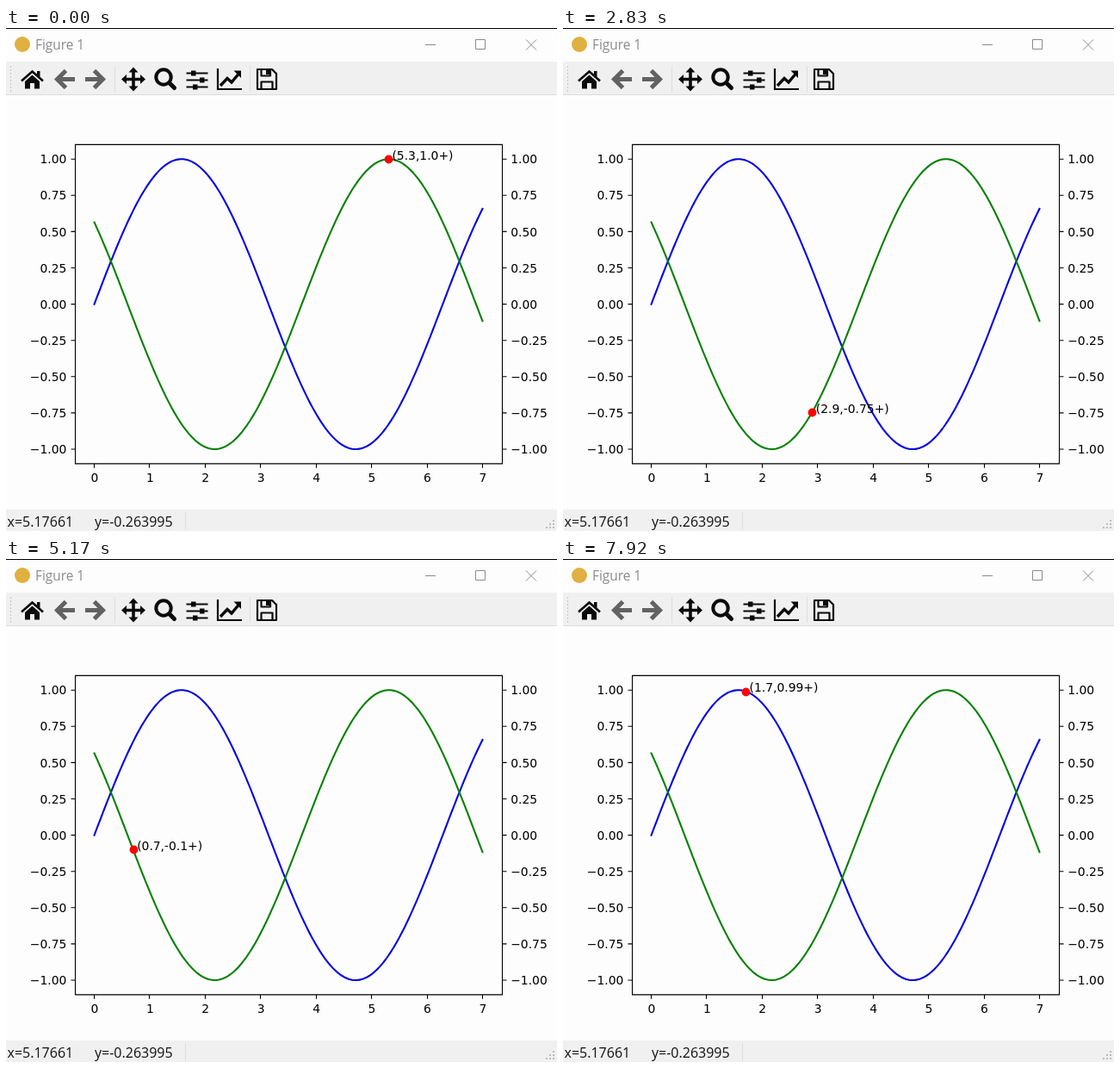
An HTML page that plays this animation: 640x584 px, repeating every 8 s.

```html
<!DOCTYPE html>
<html lang="en">
<head>
<meta charset="utf-8">
<title>Figure 1</title>
<style>
  html, body { margin: 0; width: 100%; height: 100%; overflow: hidden; background: #fdfdfd; }
  svg { display: block; }
  .plot text { font: 13.89px "DejaVu Sans", sans-serif; fill: #000; }
  .ui { font-family: "Open Sans", "Noto Sans", sans-serif; font-size: 16px; fill: #111; }
  .line { fill: none; stroke-width: 2.08; stroke-linejoin: round; stroke-linecap: square; }
  .axis { fill: none; stroke: #000; stroke-width: 1.1; }
  .win { fill: none; stroke: #8a8a8a; stroke-width: 1; }
  .stroke { fill: none; stroke: #0a0a0a; }
  .nav { fill: none; stroke: #626262; stroke-width: 5; }
</style>
</head>
<body>
<svg width="640" height="584" viewBox="0 0 640 584">
  <rect width="640" height="584" fill="#fdfdfd"/>
  <rect y="39" width="640" height="39" fill="#f0f0f0"/>
  <rect y="77" width="640" height="1" fill="#dcdcdc"/>
  <rect y="559" width="640" height="25" fill="#f0f0f0"/>
  <rect width="640" height="1" fill="#000"/>

  <!-- title bar -->
  <circle cx="19" cy="19" r="9" fill="#e0b040"/>
  <text class="ui" x="34" y="25" style="font-size:15.4px;fill:#8a8a8a">Figure 1</text>
  <path class="win" d="M487 19.5H499M545.5 13.5H556.5V24.5H545.5ZM604 13.5L616 25.5M616 13.5L604 25.5"/>

  <!-- toolbar -->
  <path d="M5.5 44V75" stroke="#c4c4c4" stroke-dasharray="2 2"/>
  <path d="M126.5 44V74M283.5 44V74" stroke="#dedede"/>
  <g>
    <path class="stroke" stroke-width="2.6" d="M18 61.5L30.5 50.5L43 61.5"/>
    <path d="M22 62L30.5 54.5L39 62V70.5H33V64H28V70.5H22ZM36 50H39.5V57L36 54Z" fill="#0a0a0a"/>
  </g>
  <path class="nav" d="M80 59.5H60M69.5 49.5L59.5 59.5L69.5 69.5"/>
  <path class="nav" d="M92 59.5H112M102.5 49.5L112.5 59.5L102.5 69.5"/>
  <path class="stroke" stroke-width="3.6" d="M148 49V70M138 59.5H158"/>
  <path fill="#0a0a0a" d="M148 45.5L153.5 51.5H142.5ZM148 73.5L153.5 67.5H142.5ZM134 59.5L140 54V65ZM162 59.5L156 54V65Z"/>
  <circle class="stroke" cx="183" cy="57" r="8.7" stroke-width="4"/>
  <path class="stroke" stroke-width="5" stroke-linecap="round" d="M190.5 64.5L195.5 69.5"/>
  <path class="stroke" stroke-width="2.2" d="M209.5 52.5H234.5M209.5 60.5H234.5M209.5 68.5H234.5"/>
  <path fill="#0a0a0a" d="M215 49.5h5.5v6h-5.5zM225 57.5h5.5v6h-5.5zM217 65.5h5.5v6h-5.5z"/>
  <path class="stroke" stroke-width="2.2" d="M246 47V71H274"/>
  <path class="stroke" stroke-width="3.4" d="M249 67L257 58.5L262 63L270 53.5"/>
  <path fill="#0a0a0a" d="M264.5 49.5H273V58Z"/>
  <path class="stroke" stroke-width="2.2" stroke-linejoin="round" d="M292 48H309L314 53V71H292ZM296.5 71V62.5H309.5V71M296.5 48V55.5H307V48"/>
  <path fill="#0a0a0a" d="M302 48h4v6h-4z"/>

  <!-- status bar -->
  <text class="ui" x="1.5" y="578.5">x=5.17661</text>
  <text class="ui" x="103" y="578.5">y=-0.263995</text>
  <path d="M208.5 562V582" stroke="#dedede"/>
  <path fill="#bcbcbc" d="M635 571h2v2h-2zM631 575h2v2h-2zM635 575h2v2h-2zM627 579h2v2h-2zM631 579h2v2h-2zM635 579h2v2h-2z"/>

  <g class="plot">
    <path id="blue" class="line" stroke="#0000e0"/>
    <path id="green" class="line" stroke="#008000"/>
    <path id="axes" class="axis"/>
    <g id="labels"></g>
    <circle id="dot" r="4.9" fill="#f00"/>
    <text id="note"></text>
  </g>
</svg>
<script>
  const $ = id => document.getElementById(id);
  const px = x => 102.55 + x * 64.416;
  const py = y => 320.6 - y * 168.4;
  const blue = x => Math.sin(x);
  const green = x => Math.sin(0.6 - x);

  function curve(id, fn) {
    let d = '';
    for (let i = 0; i <= 140; i++) {
      const x = i / 20;
      d += (i ? 'L' : 'M') + px(x).toFixed(2) + ' ' + py(fn(x)).toFixed(2);
    }
    $(id).setAttribute('d', d);
  }

  function label(x, y, anchor, str) {
    const t = document.createElementNS('http://www.w3.org/2000/svg', 'text');
    t.setAttribute('x', x);
    t.setAttribute('y', y);
    t.setAttribute('text-anchor', anchor);
    t.textContent = str;
    $('labels').append(t);
  }

  function axes() {
    const bottom = py(-1.1);
    let d = `M80.5 ${py(1.1)}H576.5V${bottom}H80.5Z`;
    for (let x = 0; x <= 7; x++) {
      const tick = Math.floor(px(x)) + 0.5;
      d += `M${tick} ${bottom}v5`;
      label(px(x) + 0.4, 526.5, 'middle', x);
    }
    for (let i = -4; i <= 4; i++) {
      const v = i / 4, y = py(v);
      const str = v.toFixed(2).replace('-', '\u2212');
      d += `M80.5 ${y}h-5M576.5 ${y}h5`;
      label(70.3, y + 5.1, 'end', str);
      label(586.2, y + 5.1, 'start', str);
    }
    $('axes').setAttribute('d', d);
  }

  // two decimals at most, one at least
  function num(v) {
    const s = String(parseFloat(v.toFixed(2)));
    return s.includes('.') ? s : s + '.0';
  }

  const LOOP = 8000, FPS = 12, STEP = 109.5, DELAY = 110, TURN = 53;
  let shown = -1;

  // the dot runs down the green curve to x = 0, then up the blue one
  function draw(now) {
    const frame = Math.floor((now % LOOP + 5) * FPS / 1000) % (LOOP * FPS / 1000);
    const k = Math.max(0, Math.floor((frame * 1000 / FPS - DELAY) / STEP));
    if (k === shown) return;
    shown = k;
    const onGreen = k <= TURN;
    const x = (onGreen ? TURN - k : k - TURN - 1) / 10;
    const y = (onGreen ? green : blue)(x);
    // the marker sits on whole pixels
    $('dot').setAttribute('cx', Math.round(px(x)) + 0.5);
    $('dot').setAttribute('cy', Math.round(py(y)) + 0.5);
    $('note').setAttribute('x', px(x) + 4.5);
    $('note').setAttribute('y', Math.round(py(y) + 0.4));
    $('note').textContent = `(${x.toFixed(1)},${num(y)}+)`;
  }

  function loop() {
    draw(performance.now());
    requestAnimationFrame(loop);
  }

  curve('blue', blue);
  curve('green', green);
  axes();
  loop();
</script>
</body>
</html>
```
